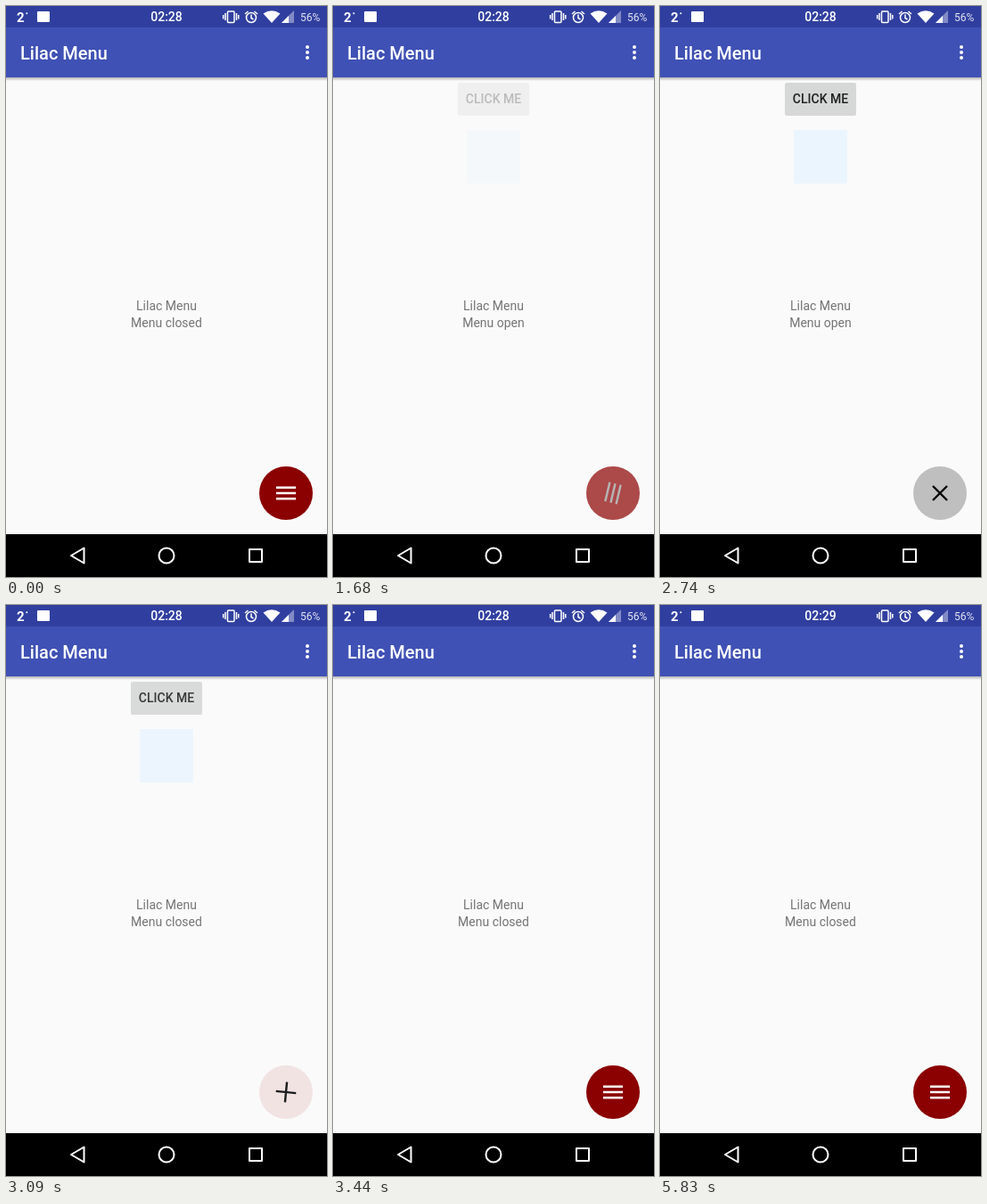
Animation, 360 px wide and 640 px high, one loop 5.92 s. Source, as an HTML page:

```html
<!DOCTYPE html>
<html lang="en">
<head>
<meta charset="utf-8">
<title>Floating button demo</title>
<style>
  html, body { margin: 0; width: 100%; height: 100%; overflow: hidden; background: #fafafa; }
  svg { display: block; width: 360px; height: 640px; font-family: Roboto, "Noto Sans", sans-serif; }
  .mid { text-anchor: middle; }
  .bold { font-weight: 500; }
  .line { fill: none; stroke-width: 2; }
  #icon { stroke-width: 2.4; }
</style>
</head>
<body>
<svg viewBox="0 0 360 640">
  <defs>
    <linearGradient id="shade" x2="0" y2="1">
      <stop offset="0" stop-opacity=".28"/>
      <stop offset="1" stop-opacity="0"/>
    </linearGradient>
  </defs>
  <rect width="360" height="640" fill="#fafafa"/>

  <!-- menu items -->
  <g id="items">
    <rect x="150" y="139" width="60" height="60" fill="#ebf5fe"/>
    <rect x="140" y="86" width="80" height="37" rx="2" fill="#d6d7d7"/>
    <text class="mid bold" x="180" y="109" font-size="14" fill="#212121">CLICK ME</text>
  </g>

  <g class="mid" font-size="14" fill="#757575">
    <text x="180" y="341">Lilac Menu</text>
    <text id="state" x="180" y="360">Menu closed</text>
  </g>

  <!-- bars -->
  <rect y="80" width="360" height="4" fill="url(#shade)"/>
  <rect y="24" width="360" height="56" fill="#3f51b5"/>
  <rect width="360" height="24" fill="#303f9f"/>
  <text class="bold" x="16" y="60" font-size="20" fill="#fff">Lilac Menu</text>
  <g fill="#fff">
    <circle cx="338" cy="46" r="2"/>
    <circle cx="338" cy="52" r="2"/>
    <circle cx="338" cy="58" r="2"/>
  </g>

  <!-- status icons -->
  <g fill="#fff">
    <text x="12" y="18" font-size="15" font-weight="700">2</text>
    <circle cx="23.3" cy="8.2" r="1"/>
    <rect x="35" y="6" width="14" height="12" rx="1"/>
    <text id="clock" class="mid bold" x="180" y="17" font-size="14">02:28</text>
    <path d="M288.500 8.500Q298 2 307.500 8.500L298 19Z"/>
    <path d="M323 5V19H309Z" opacity=".4"/>
    <path d="M317 11V19H309Z"/>
    <text x="330" y="17" font-size="12" fill="#e3e5f2">56%</text>
  </g>
  <g fill="none" stroke="#fff" stroke-width="1.5">
    <rect x="248.500" y="6" width="7.500" height="12.500" rx="1"/>
    <path d="M246 8V16M258.500 8V16M243.700 10V14.500M260.800 10V14.500"/>
    <circle cx="275" cy="13" r="5.500"/>
    <path d="M275 9.500V13.500L277.500 15M268 9L271.500 6M282 9L278.500 6"/>
  </g>

  <!-- navigation -->
  <rect y="592" width="360" height="48" fill="#000"/>
  <g class="line" stroke="#fff" stroke-linejoin="round">
    <path d="M73 616L87.500 607.500V624.500Z"/>
    <circle cx="180" cy="616" r="8.500"/>
    <rect x="273" y="609" width="14" height="14"/>
  </g>

  <!-- floating button -->
  <g transform="translate(314 546)">
    <circle id="fab" r="30"/>
    <circle id="press" r="30"/>
    <path id="icon" class="line"/>
  </g>
</svg>
<script>
const LOOP = 5920;
const BARS = "M-11-6.300H11M-11 0H11M-11 6.300H11";
const CROSS = "M-8-8L8 8M8-8L-8 8";
const OPEN = 1536, CLOSE = 3004, TIME = 400;
const PRESSES = [1320, 2740], FADE = 270;

// moments at which the screen refreshes
const TICKS = [0, 1320, 1410, 1500, 1590, 1680, 1770, 1850, 1940,
  2740, 2830, 2920, 3010, 3090, 3180, 3270, 3360, 3440, 5740];

const $ = id => document.getElementById(id);
const set = (id, attrs) => {
  for (const key in attrs) $(id).setAttribute(key, attrs[key]);
};
const ease = x => 0.5 - Math.cos(Math.PI * Math.min(1, Math.max(0, x))) / 2;
const mix = (from, to, p) => `rgb(${from.map((c, i) => Math.round(c + (to[i] - c) * p))})`;

function draw(time) {
  const t = TICKS.filter(tick => tick <= time).pop();
  const p = ease((t - OPEN) / TIME) - ease((t - CLOSE) / TIME);
  const sincePress = Math.min(...PRESSES.map(at => t < at ? FADE : t - at));

  set("fab", { fill: mix([139, 0, 0], [255, 255, 255], p) });
  set("press", { opacity: 0.25 * Math.max(0, 1 - sincePress / FADE) });
  set("icon", {
    d: p < 0.5 ? BARS : CROSS,
    stroke: mix([255, 255, 255], [0, 0, 0], p),
    transform: `rotate(${360 * p})`
  });
  set("items", { opacity: p });
  $("state").textContent = t > OPEN && t < CLOSE ? "Menu open" : "Menu closed";
  $("clock").textContent = t < 5740 ? "02:28" : "02:29";
}

const start = performance.now();
function tick() {
  draw((performance.now() - start) % LOOP);
  requestAnimationFrame(tick);
}
tick();
</script>
</body>
</html>
```
